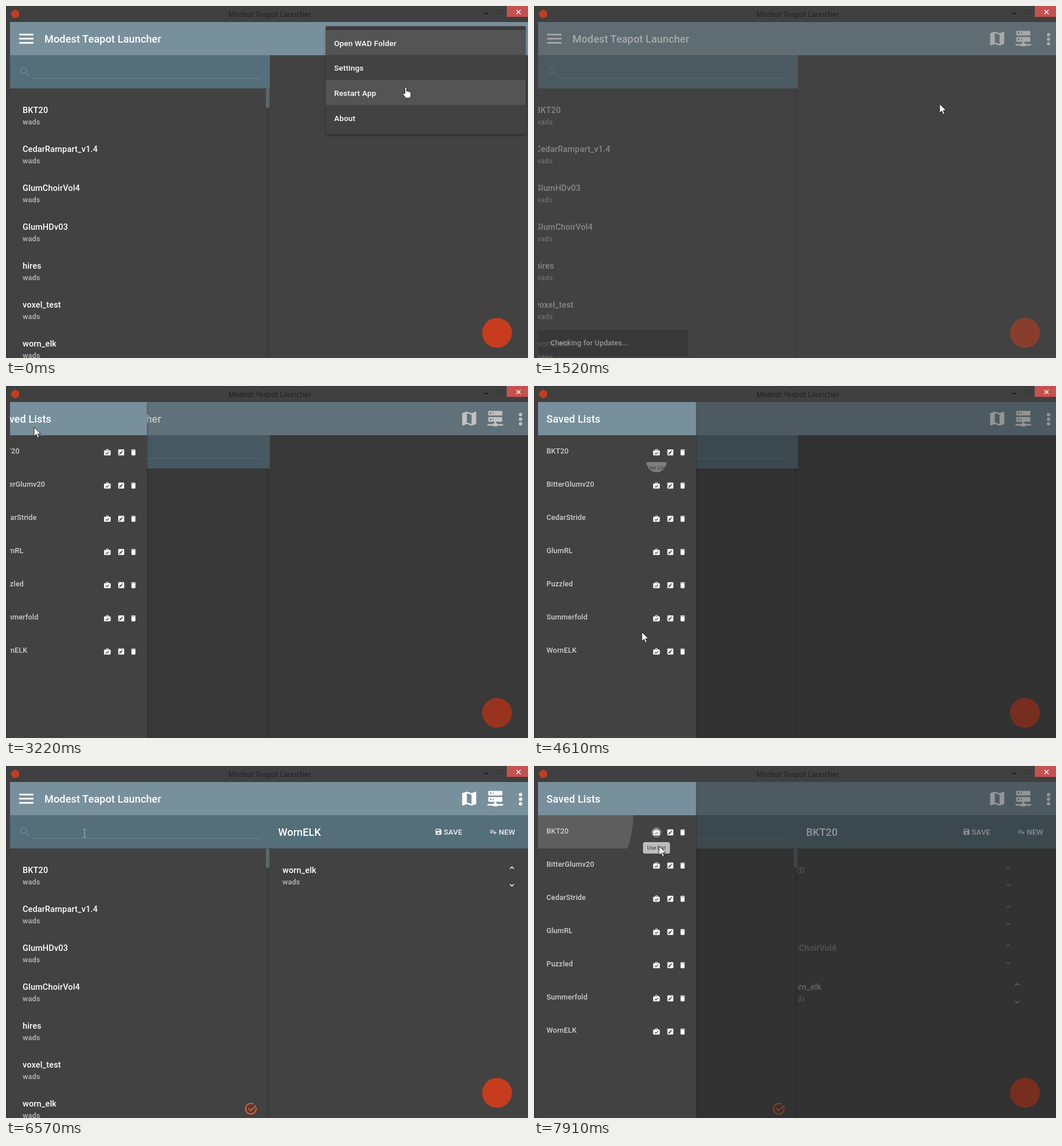
These frames come from a looping animation (910x615 px, 8000 ms). An HTML page:

```html
<!DOCTYPE html>
<html lang="en">
<head>
<meta charset="utf-8">
<title>Modest Teapot Launcher</title>
<style>
  html, body { margin: 0; width: 100%; height: 100%; overflow: hidden; background: #404040; }
  svg { display: block; width: 910px; height: 615px; }
  text { font-family: Roboto, sans-serif; font-weight: 500; letter-spacing: .01em; fill: #fff; white-space: pre; }
  .big { font-size: 18.12px; letter-spacing: .005em; }
  .item { font-size: 14.5px; }
  .sub { font-size: 12.7px; fill: #b6b6b6; }
  .menu { font-size: 13.6px; }
  .btn { font-size: 13.1px; fill: #eee; }
  .side { font-size: 12.7px; fill: #cdcdcd; }
  .tip { font-size: 9.06px; font-weight: 400; letter-spacing: 0; fill: #333; }
  .win { font-family: "Open Sans", sans-serif; font-weight: 400; font-size: 12.5px; letter-spacing: 0; fill: #1d1d1d; }
</style>
</head>
<body>
<svg id="stage" viewBox="0 0 910 615" xmlns="http://www.w3.org/2000/svg"></svg>
<script>
const LOOP = 8000;
const RELOAD = 390, READY = 1520;
const OPEN_1 = 3069, CLOSE_1 = 6050, OPEN_2 = 7100;
const PICK_1 = 5150, PICK_2 = 7800;
const APP = 'Modest Teapot Launcher';
const BAR = '#78909c', SUBBAR = '#546e7a', PANEL = '#424242', LOGO = '#c63c1c';

const wads = ['BKT20', 'CedarRampart_v1.4', 'GlumHDv03', 'GlumChoirVol4', 'hires', 'voxel_test', 'worn_elk'];
const lists = ['BKT20', 'BitterGlumv20', 'CedarStride', 'GlumRL', 'Puzzled', 'Summerfold', 'WornELK'];

// markup helpers
const rect = (x, y, w, h, fill, more = '') =>
  `<rect x="${x}" y="${y}" width="${w}" height="${h}" fill="${fill}" ${more}/>`;
const text = (x, y, cls, s, more = '') => `<text x="${x}" y="${y}" class="${cls}" ${more}>${s}</text>`;
const group = (id, body, more = '') => `<g id="${id}" ${more}>${body}</g>`;
const icon = (cx, cy, scale, d, fill = '#fff') =>
  `<path transform="translate(${cx - 12 * scale} ${cy - 12 * scale}) scale(${scale})" fill="${fill}" fill-rule="evenodd" d="${d}"/>`;
const line = (d, color, width) => `<path d="${d}" fill="none" stroke="${color}" stroke-width="${width}"/>`;

const ICON = {
  search: 'M15.5 14h-.8l-.3-.3A6.5 6.5 0 1 0 13.7 14.4l.3.3v.8l5 5 1.5-1.5zM9.5 14a4.500 4.500 0 1 1 0-9 4.500 4.500 0 0 1 0 9z',
  map: 'M20.500 3l-.2 0L15 5.100 9 3 3.400 4.900Q3 5 3 5.400V20.500Q3 21 3.500 21L9 18.900l6 2.100 5.600-1.900Q21 19 21 18.600V3.500Q21 3 20.500 3zM15 19l-6-2.100V5l6 2.100z',
  server: 'M13 18h1a1 1 0 0 1 1 1h7v2h-7a1 1 0 0 1-1 1h-4a1 1 0 0 1-1-1H2v-2h7a1 1 0 0 1 1-1h1v-2H4a1 1 0 0 1-1-1v-4a1 1 0 0 1 1-1h16a1 1 0 0 1 1 1v4a1 1 0 0 1-1 1h-7zM4 2h16a1 1 0 0 1 1 1v4a1 1 0 0 1-1 1H4a1 1 0 0 1-1-1V3a1 1 0 0 1 1-1M9 6h1V4H9zM9 14h1v-2H9zM5 4v2h2V4zM5 12v2h2v-2z',
  use: 'M8 6V4l2-2h4l2 2v2h4a2 2 0 0 1 2 2v11a2 2 0 0 1-2 2H4a2 2 0 0 1-2-2V8a2 2 0 0 1 2-2zM10 6h4V4h-4zM10.500 18.500l7-7-1.500-1.500-5.500 5.500-2.500-2.500L6.500 14.500z',
  edit: 'M5 3h14a2 2 0 0 1 2 2v14a2 2 0 0 1-2 2H5a2 2 0 0 1-2-2V5a2 2 0 0 1 2-2M6 15.500V18h2.500l7-7L13 8.500zM14 7.500L16.500 10 18 8.500 15.500 6z',
  trash: 'M6 19a2 2 0 0 0 2 2h8a2 2 0 0 0 2-2V7H6zM19 4h-3.500l-1-1h-5l-1 1H5v2h14z',
  save: 'M17 3H5a2 2 0 0 0-2 2v14a2 2 0 0 0 2 2h14a2 2 0 0 0 2-2V7zM12 19a3 3 0 1 1 0-6 3 3 0 0 1 0 6M15 9H5V5h10z',
  add: 'M2 6h12v2H2zM2 10h12v2H2zM2 14h8v2H2zM16 10h2v4h4v2h-4v4h-2v-4h-4v-2h4z'
};

const wad = (x, row, name, more = '') =>
  text(x, 186.5 + row * 68, 'item', name, more) + text(x, 206.5 + row * 68, 'sub', 'wads');

const chosen = (row, name) => {
  const y = row * 68;
  return wad(482, row, name) +
    line(`M878.500 ${179.5 + y}l3.500-3.300 3.500 3.300M878.500 ${206.5 + y}l3.500 3.300 3.500-3.300`, '#fff', 1.5);
};

const menu = () => rect(557.5, 35.5, 348.5, 188.5, PANEL, 'rx="2" filter="url(#shadow)"') +
  rect(557.5, 35.5, 348.5, 6.5, '#3c3c3c') +
  [0, 2].map(i => rect(557.5, 42 + i * 43.6, 348.5, 43.6, '#545454')).join('') +
  ['Open WAD Folder', 'Settings', 'Restart App', 'About']
    .map((s, i) => text(572, 69.8 + i * 43.6, 'menu', s)).join('');

const page = () =>
  rect(453, 144, 7, 471, '#000', 'opacity=".07"') +
  group('left', wads.map((s, i) => wad(29, i, s, `id="wad${i}"`)).join('')) +
  group('check', line('M435.900 597a9.200 9.200 0 1 1-4.700-6.300', '#ff5722', 2) +
    line('M422.500 598l4.200 4.200 9-9', '#ff5722', 2)) +
  rect(453, 144, 6.5, 34, '#5a666b', 'rx="3" id="thumb"') +
  `<g clip-path="url(#right)">${group('old', chosen(0, 'worn_elk'))}${
    group('new', ['BKT20', 'hires', 'GlumChoirVol4'].map((s, i) => chosen(i, s)).join(''))}` +
  group('head', rect(460, 86, 450, 58, SUBBAR) + text(474.5, 122, 'big', '', 'id="headName"') +
    icon(754, 115, .58, ICON.save, '#eee') + text(763, 119.7, 'btn', 'SAVE') +
    icon(849.5, 115, .56, ICON.add, '#eee') + text(859, 119.7, 'btn', 'NEW')) + '</g>' +
  rect(7, 86, 453, 58, SUBBAR) + icon(33, 114.5, .906, ICON.search, '#6d8590') +
  rect(45, 126, 399, 1, '#6d8590') +
  rect(7, 28, 903, 58, BAR) +
  [48.5, 55.7, 63].map(y => rect(23, y, 25, 2.8, '#fff')).join('') +
  text(67, 64.3, 'big', APP) +
  icon(807.5, 57, 1.36, ICON.map) + icon(853, 57, 1.36, ICON.server) +
  [50, 58, 66].map(y => `<circle cx="897" cy="${y}" r="3" fill="#fff"/>`).join('') +
  `<circle cx="856" cy="571" r="26" fill="${LOGO}"/>`;

const drawer = () => rect(7, 28, 275.5, 587, PANEL, 'filter="url(#shadow)"') +
  rect(7, 28, 275.5, 58, BAR) + text(21.7, 64.3, 'big', 'Saved Lists') +
  group('ripple', '<circle id="wave" cx="4" cy="0" fill="#fff"/>', 'clip-path="url(#row)"') +
  '<circle id="focus" cx="213.500" r="9" fill="#fff" fill-opacity=".28"/>' +
  lists.map((s, i) => {
    const y = 116 + i * 58;
    return text(21.7, y + 2, 'side', s) + icon(213.5, y, .58, ICON.use) +
      icon(237.7, y, .58, ICON.edit) + icon(259, y, .58, ICON.trash);
  }).join('') +
  group('tip', rect(190, 0, 47, 20, '#bdbdbd', 'rx="3.500"') +
    text(213.5, 13.3, 'tip', 'Use List', 'text-anchor="middle"'), 'clip-path="url(#bubble)"');

const frame = () => rect(0, 0, 910, 1, '#303030') + rect(0, 0, 1, 615, '#303030') +
  `<circle cx="16" cy="14" r="7" fill="${LOGO}"/>` +
  text(460, 19, 'win', APP, 'text-anchor="middle"') +
  rect(833, 12, 8, 2, '#1c1c1c') + line('M856.500 7.500h8v6h-8z', '#333', 1) +
  rect(873, 0, 37, 19, '#c75050') + line('M890 7l7 7M897 7l-7 7', '#fff', 1.5);

const cursors = group('arrow', '<path d="M0 0V16l3.800-3.600 2.600 6 2.600-1.100-2.600-5.700h5.200z" fill="#fff" stroke="#111" stroke-width=".9"/>') +
  group('hand', '<path d="M-1.600 11V1.500a1.600 1.600 0 0 1 3.200 0V7c1-.8 2.600-.5 2.900.5 1-.5 2.300-.1 2.500.9 1-.3 1.900.3 1.900 1.400v4c0 2.400-1.700 3.200-1.700 5.200H-.4c-.4-1.800-3-4.200-4.600-6.800-.8-1.600 1-2.800 2.200-1.600z" fill="#fff" stroke="#111" stroke-width="1"/>') +
  group('beam', line('M-3-6.500h2.400L0-6l.6-.5H3M0-6V6.500M-3 7h2.400L0 6.500l.6.500H3', '#b8b8b8', 1));

document.getElementById('stage').innerHTML = `<defs>
  <clipPath id="client"><rect x="7" y="28" width="903" height="587"/></clipPath>
  <clipPath id="right"><rect x="460" y="86" width="450" height="529"/></clipPath>
  <clipPath id="row"><rect x="7" y="0" width="275.500" height="58"/></clipPath>
  <clipPath id="bubble"><circle id="hole" cx="213.500" cy="0"/></clipPath>
  <filter id="shadow" x="-10%" y="-10%" width="120%" height="120%"><feDropShadow dx="0" dy="2" stdDeviation="2" flood-opacity=".35"/></filter>
  </defs>` + rect(0, 0, 910, 615, '#404040') +
  `<g clip-path="url(#client)">${rect(7, 28, 903, 587, PANEL)}` +
  group('page', page()) + group('menu', menu()) +
  group('toast', rect(7, 566, 262, 45.5, '#323232', 'rx="2"') + text(28.7, 593, 'side', 'Checking for Updates...')) +
  rect(7, 28, 903, 587, '#212121', 'id="shade"') + group('drawer', drawer()) + '</g>' +
  frame() + group('cursor', cursors);

const el = {};
document.querySelectorAll('[id]').forEach(n => el[n.id] = n);

// timing helpers
const clamp = v => Math.max(0, Math.min(1, v));
const ramp = (t, from, ms) => clamp((t - from) / ms);
const out = u => 1 - (1 - u) ** 3;
const bezier = (x1, y1, x2, y2) => {
  const at = (a, b, s) => 3 * a * s * (1 - s) ** 2 + 3 * b * s * s * (1 - s) + s ** 3;
  return x => {
    let lo = 0, hi = 1;
    for (let i = 0; i < 20; i++) {
      const mid = (lo + hi) / 2;
      if (at(x1, x2, mid) < x) lo = mid; else hi = mid;
    }
    return at(y1, y2, lo);
  };
};
const swift = bezier(.25, .8, .25, 1), ease = bezier(.25, .1, .25, 1);

const show = (n, opacity) => {
  n.style.display = opacity > 0 ? '' : 'none';
  n.setAttribute('opacity', opacity);
};
const move = (n, x, y) => n.setAttribute('transform', `translate(${x} ${y})`);

// time, x, y, shape
const path = [
  [0, 697, 142, 'hand'], [390, 699, 163, 'arrow'], [660, 696, 168, 'arrow'], [1240, 687, 156, 'arrow'],
  [1520, 707, 171, 'arrow'], [1900, 650, 150, 'arrow'], [2520, 260, 90, 'arrow'], [2900, 38, 58, 'hand'],
  [3069, 36, 58, 'hand'], [3150, 41, 63, 'arrow'], [3220, 49, 72, 'arrow'], [3610, 64, 102, 'arrow'],
  [4100, 212, 112, 'hand'], [4400, 214, 116, 'hand'], [4440, 213, 130, 'arrow'], [4610, 188, 430, 'arrow'],
  [4800, 213, 457, 'hand'], [5200, 214, 460, 'hand'], [5280, 220, 468, 'arrow'], [5430, 236, 490, 'arrow'],
  [5850, 345, 400, 'arrow'], [6050, 345, 395, 'arrow'], [6480, 150, 130, 'beam'], [6570, 137, 117, 'beam'],
  [6850, 60, 80, 'arrow'], [7000, 36, 58, 'hand'], [7140, 36, 58, 'arrow'], [7600, 212, 114, 'hand'],
  [7810, 214, 118, 'hand'], [7860, 216, 130, 'arrow'], [7910, 218, 140, 'arrow'], [8000, 218, 140, 'arrow']
];

function pointer(t) {
  let i = 0;
  while (i < path.length - 2 && path[i + 1][0] <= t) i++;
  const [t0, x0, y0, shape] = path[i], [t1, x1, y1] = path[i + 1];
  const u = t < READY ? 0 : ramp(t, t0, t1 - t0);
  const k = u * u * (3 - 2 * u);
  move(el.cursor, x0 + (x1 - x0) * k, y0 + (y1 - y0) * k);
  for (const s of ['arrow', 'hand', 'beam']) show(el[s], s === shape ? 1 : 0);
}

function opened(t, curve, ms) {
  if (t >= OPEN_2) return curve(ramp(t, OPEN_2, ms));
  if (t >= CLOSE_1) return 1 - curve(ramp(t, CLOSE_1, ms));
  return curve(ramp(t, OPEN_1, ms));
}

const slide = (n, p, y = 0) => {
  show(n, p);
  move(n, -82 * (1 - p), y);
};

function pick(t) {
  const second = t >= PICK_2;
  const age = t - (second ? PICK_2 : PICK_1), row = second ? 0 : 6;
  show(el.ripple, age < 0 ? 0 : Math.max(0, .2 - .00047 * age));
  move(el.ripple, 0, 86 + row * 58);
  el.wave.setAttribute('r', Math.max(0, 240 * (1 - Math.exp(-age / 91))));
  el.focus.setAttribute('cy', 116 + row * 58);
  show(el.focus, age < 0 ? 0 : 1 - ramp(age, 500, 200));

  const head = out(ramp(t, PICK_1 + 4, 500));
  show(el.head, head);
  move(el.head, 0, -58 * (1 - head));
  show(el.check, head);
  el.headName.textContent = second ? 'BKT20' : 'WornELK';
  const leaving = t >= PICK_2 + 12;
  slide(el.old, leaving ? 1 - out(ramp(t, PICK_2 + 12, 500)) : head, leaving ? 204 : 0);
  slide(el.new, out(ramp(t, PICK_2 + 48, 500)));
}

function tooltip(t) {
  const span = (from, to) => ramp(t, from, 150) - ramp(t, to, 120);
  const v = Math.max(span(4230, 4550), span(4950, 5270), span(7640, LOOP));
  show(el.tip, v);
  move(el.tip, 0, t > 4800 && t < 6000 ? 481 : 133);
  el.hole.setAttribute('r', 36 * v);
}

function draw(t) {
  const fresh = t >= READY;
  const fade = fresh ? ramp(t, 1358, 300) : t < RELOAD ? 1 : 0;
  show(el.page, fade);
  show(el.menu, 1 - ramp(t, 120, 140));
  slide(el.left, fresh ? out(ramp(t, 1365, 500)) : 1);
  el.wad2.textContent = wads[fresh ? 2 : 3];
  el.wad3.textContent = wads[fresh ? 3 : 2];
  show(el.thumb, t < RELOAD || t >= CLOSE_1 ? 1 : 0);

  const gone = ramp(t, 2480, 200);
  show(el.toast, fresh ? ramp(t, 1340, 300) * (1 - gone) : 0);
  move(el.toast, 0, 46 * gone);

  const p = opened(t, swift, 400);
  show(el.drawer, p > .001 ? 1 : 0);
  move(el.drawer, -275.5 * (1 - p), 0);
  show(el.shade, .48 * opened(t, ease, 450));
  pick(t);
  tooltip(t);
  pointer(t);
}

function tick() {
  draw(performance.now() % LOOP);
  requestAnimationFrame(tick);
}
tick();
</script>
</body>
</html>
```
